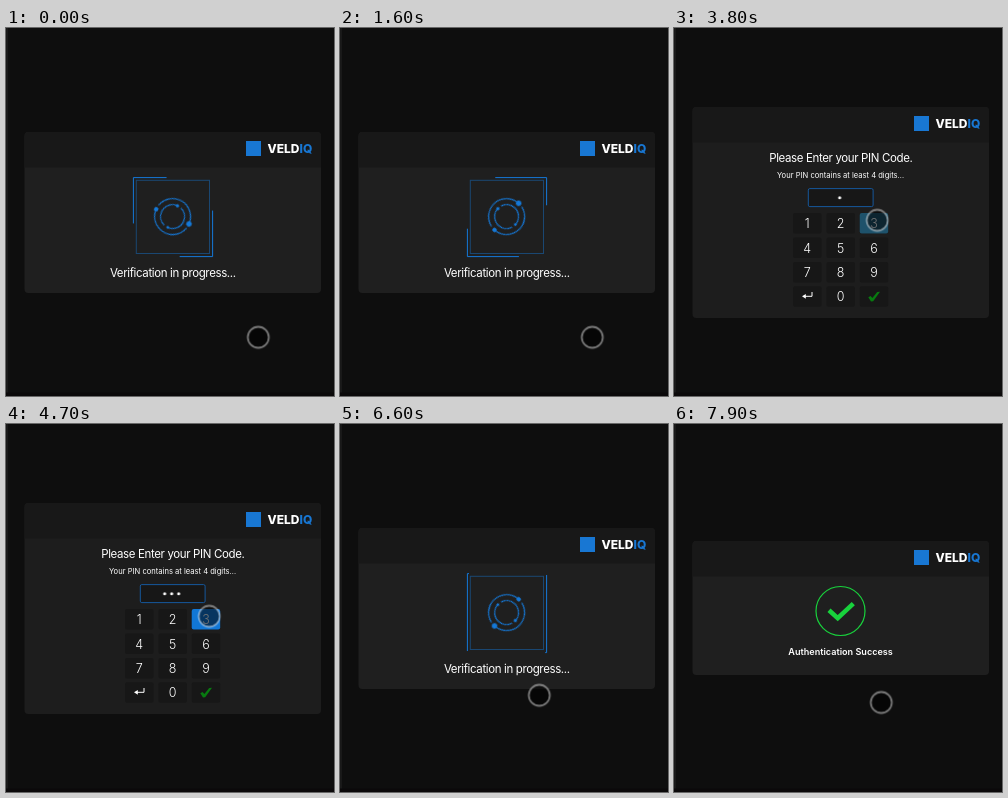
Recreate the animation shown at these times as an HTML page. Size 328 px wide and 368 px high, loop 8000 ms.

```html
<!DOCTYPE html>
<html lang="en">
<head>
<meta charset="utf-8">
<title>PIN verification</title>
<style>
  html, body { margin: 0; width: 100%; height: 100%; overflow: hidden; background: #0e0e0e; }
  svg { display: block; width: 328px; height: 368px; }
  text { font-family: Inter, Roboto, sans-serif; fill: #fff; text-anchor: middle; }
  .title { font-size: 11.5px; letter-spacing: -.37px; }
  .hint { font-size: 7.6px; }
  .result { font-size: 9.1px; font-weight: 600; }
  .brand { font-size: 12px; font-weight: 800; text-anchor: start; }
  .brand tspan, .mark { fill: #1877d3; }
  .digits { font-size: 12.5px; font-weight: 300; }
  .line { fill: none; stroke: #1478d8; }

  /* every animation shares the 8 s loop */
  .scene, .dots, .dots circle { animation: 8s step-end infinite; }
  .wait { animation-name: wait; }
  .pin { animation-name: pin; }
  .done { animation-name: done; }
  @keyframes wait { 0%, 76.25% { visibility: visible } 25%, 90% { visibility: hidden } }
  @keyframes pin { 0%, 76.25% { visibility: hidden } 25% { visibility: visible } }
  @keyframes done { 0% { visibility: hidden } 90% { visibility: visible } }

  .orbit { animation: spin 8s linear infinite; }
  @keyframes spin { from { transform: rotate(24deg) } to { transform: rotate(1464deg) } }
  .chase { stroke-dasharray: 79; animation: chase 8s linear infinite; }
  @keyframes chase { from { stroke-dashoffset: -33.2px } to { stroke-dashoffset: 388.1px } }

  .dots { animation-name: shift; }
  @keyframes shift {
    0% { transform: translateX(10.5px) }
    52.5% { transform: translateX(7px) }
    58.75% { transform: translateX(3.5px) }
    63.75% { transform: translateX(0) }
  }
  .dots .d1 { animation-name: d1; }
  .dots .d2 { animation-name: d2; }
  .dots .d3 { animation-name: d3; }
  .dots .d4 { animation-name: d4; }
  @keyframes d1 { 0% { opacity: 0 } 46.25% { opacity: 1 } }
  @keyframes d2 { 0% { opacity: 0 } 52.5% { opacity: 1 } }
  @keyframes d3 { 0% { opacity: 0 } 58.75% { opacity: 1 } }
  @keyframes d4 { 0% { opacity: 0 } 63.75% { opacity: 1 } }

  /* teal tap highlight, then the focus colour stays */
  .pressed { animation: press 8s step-end infinite; }
  @keyframes press { 0% { fill: #161616 } 46.25% { fill: #1e526b } 48.75% { fill: #1177d6 } }

  .ring { stroke-dasharray: 1; animation: ring 8s ease-out infinite; }
  @keyframes ring { 0%, 90% { stroke-dashoffset: 1 } 95%, 100% { stroke-dashoffset: 0 } }
  .tick { stroke-dasharray: 1 2; animation: tick 8s ease-out infinite; }
  @keyframes tick { 0%, 92% { stroke-dashoffset: 1 } 96.5%, 100% { stroke-dashoffset: 0 } }

  .pointer { animation: move 8s ease-in-out infinite; }
  @keyframes move {
    0%, 26.25% { transform: translate(252.3px, 309.3px) }
    31.25%, 36.25% { transform: translate(218.3px, 194.3px) }
    43.75%, 62.5% { transform: translate(203.2px, 192.3px) }
    65.6% { transform: translate(214px, 235px); animation-timing-function: ease-out }
    67.5% { transform: translate(204px, 277.5px) }
    68.75%, 70% { transform: translate(204px, 288px) }
    72.5% { transform: translate(201.3px, 276.3px) }
    75%, 93.75% { transform: translate(199.3px, 271.3px) }
    97.5%, 100% { transform: translate(207.3px, 278.5px) }
  }
</style>
</head>
<body>
<svg viewBox="0 0 328 368">
  <defs>
    <g id="head">
      <path d="M18.5 35.5V4a4 4 0 0 1 4-4H311a4 4 0 0 1 4 4V35.5Z" fill="#181818"/>
      <rect class="mark" x="240" y="9" width="15" height="15"/>
      <text class="brand" x="261.5" y="21">VELD<tspan>IQ</tspan></text>
    </g>
    <rect id="key" width="28.5" height="20.5" rx="2"/>
    <g id="row" fill="#171717">
      <use href="#key" x="119"/>
      <use href="#key" x="152.5"/>
      <use href="#key" x="185.7"/>
    </g>
  </defs>

  <rect width="328" height="368" fill="#0e0e0e"/>
  <rect width="2" height="368" fill="#191919"/>
  <rect y="364.5" width="328" height="3.5" fill="#0b090a"/>

  <g class="scene wait">
    <rect x="18.5" y="104" width="296.5" height="161" rx="4" fill="#1f1f1f"/>
    <use href="#head" y="104"/>
    <rect class="line" x="130.3" y="152.3" width="73.2" height="73.2" opacity=".45"/>
    <path class="line chase" d="M127.4 228.6V149.6H206.6V228.6Z"/>
    <g transform="translate(166.6 188.6)">
      <g class="orbit" fill="#1478d8">
        <circle class="line" r="18" stroke-width="1.1" pathLength="360" stroke-dasharray="165 15" stroke-dashoffset="-15"/>
        <circle class="line" r="12" stroke-width="1.1" pathLength="360" stroke-dasharray="160 20" stroke-dashoffset="-110"/>
        <circle cx="18" r="2.7"/>
        <circle cx="-18" r="2.2"/>
        <circle cy="-11.8" r="1.6"/>
        <circle cy="11.8" r="1.4"/>
      </g>
    </g>
    <text class="title" x="166.8" y="249">Verification in progress...</text>
  </g>

  <g class="scene pin">
    <rect x="18.5" y="79" width="296.5" height="211" rx="4" fill="#1d1d1d"/>
    <use href="#head" y="79"/>
    <text class="title" x="166.8" y="134">Please Enter your PIN Code.</text>
    <text class="hint" x="166.6" y="150">Your PIN contains at least 4 digits...</text>
    <rect x="134.3" y="160.6" width="64.8" height="18" rx="1.5" fill="#171717" stroke="#16589c"/>
    <g class="dots" fill="#fff">
      <circle class="d1" cx="155.2" cy="169.8" r="1.5"/>
      <circle class="d2" cx="162.2" cy="169.8" r="1.5"/>
      <circle class="d3" cx="169.2" cy="169.8" r="1.5"/>
      <circle class="d4" cx="176.2" cy="169.8" r="1.5"/>
    </g>
    <use href="#row" y="185"/>
    <use href="#row" y="209.4"/>
    <use href="#row" y="233.9"/>
    <use href="#row" y="258.3"/>
    <use class="pressed" href="#key" x="185.7" y="185"/>
    <g class="digits">
      <text x="133.2" y="200">1</text><text x="166.7" y="200">2</text><text x="200" y="200">3</text>
      <text x="133.2" y="224.5">4</text><text x="166.7" y="224.5">5</text><text x="200" y="224.5">6</text>
      <text x="133.2" y="249">7</text><text x="166.7" y="249">8</text><text x="200" y="249">9</text>
      <text x="166.7" y="273.2">0</text>
    </g>
    <path d="M138 264V268.3H130" fill="none" stroke="#fff"/>
    <path d="M128 268.3L131.8 265.9V270.7Z" fill="#fff"/>
    <path d="M194.3 269.3L196.6 267.9L198.4 270L203.2 264L206 263.8L199.2 273.2L197 273.4Z" fill="#087a10"/>
  </g>

  <g class="scene done">
    <rect x="18.5" y="117" width="296.5" height="134" rx="4" fill="#1f1f1f"/>
    <use href="#head" y="117"/>
    <g fill="none" stroke="#18d23c">
      <circle class="ring" cx="166.5" cy="187" r="24.5" stroke-width="1.2" pathLength="1" transform="rotate(-90 166.5 187)"/>
      <path class="tick" d="M155 186.3L163.7 194.2L179.3 179.6" stroke-width="4.6" pathLength="1"/>
    </g>
    <text class="result" x="166.6" y="231">Authentication Success</text>
  </g>

  <circle class="pointer" r="10.5" fill="#000" fill-opacity=".55" stroke="#fff" stroke-opacity=".45" stroke-width="1.8"/>
</svg>
</body>
</html>
```
